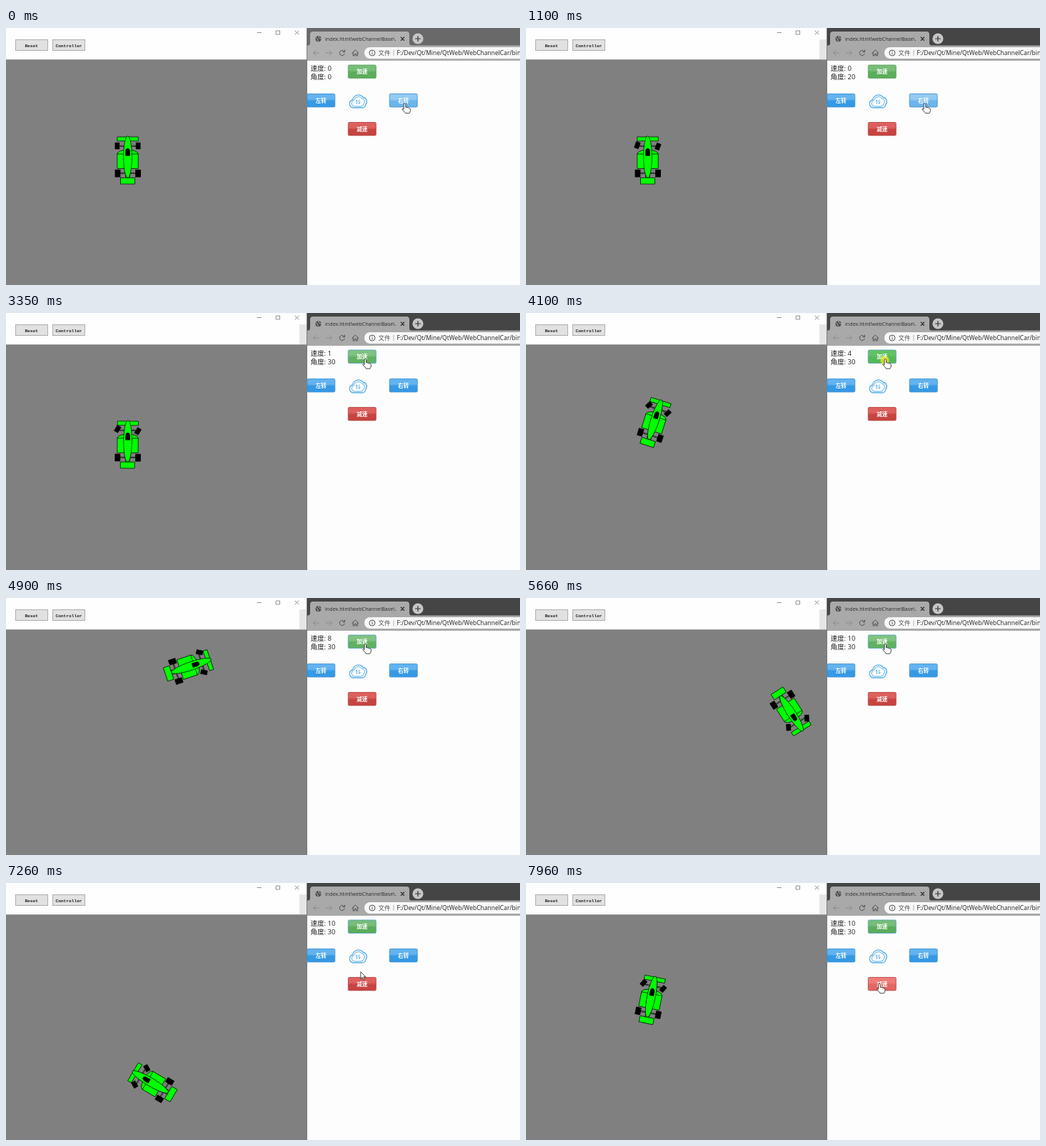
An HTML page that plays this animation: 720 by 361 pixels, repeating every 7.99 s.

```html
<!DOCTYPE html>
<html lang="zh-CN">
<head>
<meta charset="utf-8">
<style>
html, body { margin: 0; width: 100%; height: 100%; overflow: hidden; background: #fdfdfd; }
svg { display: block; width: 720px; height: 361px; }
text { white-space: pre; }
.mono { font: bold 6.2px "Liberation Mono", monospace; fill: #222; text-anchor: middle; }
.ui { font-family: "Open Sans", "Noto Sans CJK SC", "Noto Sans CJK", sans-serif; }
.btn { font: bold 7.6px "Noto Sans CJK SC", "Noto Sans CJK", sans-serif; fill: #fff; text-anchor: middle; }
.line { fill: none; stroke-linecap: round; stroke-linejoin: round; }
</style>
</head>
<body>
<svg id="stage" viewBox="0 0 720 361" xmlns="http://www.w3.org/2000/svg">
  <defs>
    <clipPath id="tabClip"><rect x="446" y="6" width="101" height="18"/></clipPath>
    <clipPath id="sceneClip"><rect y="45" width="421" height="316"/></clipPath>
  </defs>

  <!-- car window -->
  <rect width="421" height="45" fill="#fefefe"/>
  <rect id="blurEdge" x="411" y="16" width="10" height="28" fill="#e5e5e5"/>
  <g class="line" stroke="#777" stroke-width=".8">
    <path d="M352 6.5h5.5M378.5 4h5v5h-5zM405 4l5 5m0-5l-5 5"/>
  </g>
  <g fill="#e1e1e1" stroke="#adadad">
    <rect x="13.5" y="16.5" width="45" height="15"/>
    <rect x="65.5" y="16.5" width="45" height="15"/>
  </g>
  <text class="mono" x="35.7" y="26.6">Reset</text>
  <text class="mono" x="88" y="26.6">Controller</text>
  <rect y="45" width="421" height="316" fill="#808080"/>
  <rect y="44" width="421" height="1" fill="#a0a0a0"/>

  <g clip-path="url(#sceneClip)">
    <g id="car" stroke="#000" stroke-width="1.2">
      <path fill="#a0a0a4" d="M-20-58h40v2h-40zM-20 7h40v2h-40z"/>
      <g fill="#0f0">
        <rect x="-25" y="-79" width="50" height="10"/>
        <ellipse cx="0" cy="-38" rx="25" ry="10"/>
        <rect x="-25" y="-38" width="50" height="35"/>
        <rect x="-5" y="9" width="10" height="10"/>
        <ellipse cx="0" cy="-31" rx="10" ry="50"/>
        <rect x="-17" y="19" width="34" height="15"/>
      </g>
      <path d="M-5-43.5a5 7.5 0 0 1 10 0v9.5h-10z"/>
      <rect id="wheelL" x="-10" y="-7" width="10" height="15"/>
      <rect id="wheelR" x="0" y="-7" width="10" height="15"/>
      <rect x="-30" y="0" width="12" height="17"/>
      <rect x="19" y="0" width="12" height="17"/>
    </g>
  </g>

  <!-- browser window -->
  <rect x="421" y="46" width="299" height="315" fill="#fdfdfd"/>
  <rect id="strip" x="421" width="299" height="25"/>
  <g id="chrome">
    <path d="M422 25q4 0 4-4V9q0-4 4-4h131q4 0 4 4v12q0 4 4 4z"/>
    <rect x="421" y="24.5" width="299" height="21.5"/>
  </g>
  <rect x="421" width="1" height="361" fill="#7c7c82"/>
  <circle cx="437.5" cy="15.3" r="4" fill="#505050"/>
  <path class="line" d="M434.6 13.6q3 2 2.6 4.6M438 11.8q-.8 2.6 3 3.2" stroke="#b8b8b8"/>
  <g clip-path="url(#tabClip)">
    <text class="ui" x="447" y="18" font-size="7.2" fill="#2b2b2b">index.html!webChannelBase\.</text>
  </g>
  <path class="line" d="M553.3 13l4.4 4.4m0-4.4l-4.4 4.4" stroke="#222" stroke-width="1.1"/>
  <circle cx="577" cy="15" r="7.6" fill="#c6c6c6"/>
  <path class="line" d="M573.5 15h7M577 11.5v7" stroke="#333" stroke-width="1.2"/>
  <g class="line" stroke-width=".9">
    <path stroke="#888" d="M438.5 35h-8m3.5-3.5l-3.5 3.5 3.5 3.5M448.5 35h8m-3.5-3.5l3.5 3.5-3.5 3.5"/>
    <path stroke="#4a4a4a" d="M474 33.2a3.6 3.6 0 1 0 .3 3M474.5 31v2.6h-2.6M484.8 35.2l4.5-4.2 4.5 4.2M486.2 34.5v4.5h2v-2.6h2.2v2.6h2v-4.5"/>
  </g>
  <path d="M720 27H510a8 8 0 0 0 0 16H720z" fill="#f8f8f8"/>
  <circle cx="513" cy="35" r="4" fill="none" stroke="#444" stroke-width=".9"/>
  <path d="M513 34.5v2.6M513 32.6v.9" stroke="#444"/>
  <g class="ui" font-size="8.5">
    <text x="521.5" y="38" fill="#555">文件</text>
    <path d="M543 31v8" stroke="#999" stroke-width=".7"/>
    <text x="547.5" y="38" fill="#222">F:/Dev/Qt/Mine/QtWeb/WebChannelCar/bin/</text>
  </g>
  <g class="ui" font-size="9.6" fill="#222">
    <text id="speed" x="426.4" y="60.2"></text>
    <text id="angle" x="426.4" y="72.2"></text>
  </g>
  <g class="line" stroke="#58aee6">
    <path id="cloud" stroke-width="1.3" d="M486.5 112a5.6 5.6 0 0 1-1-11 8.5 8.5 0 0 1 15-3.5 5.8 5.8 0 0 1 3.5 9.5q-.5 5-5.5 5z"/>
    <use href="#cloud" transform="translate(493 104) scale(.76) translate(-493 -104)"/>
    <path d="M491.6 106.5v-5.5l-1.8 1.8M494.6 101v5.5l1.8-1.8"/>
  </g>
  <g id="buttons"></g>

  <circle id="glow" r="6" fill="#f2e820" opacity=".75"/>
  <g id="pointer" stroke="#333" stroke-width=".9" stroke-linejoin="round" fill="#fff">
    <path id="hand" d="M-1.3 1q0-1.5 1.3-1.5t1.3 1.5v4l1.2-.4 1.3.8 1.2-.1 1 .9 1.2.2q1 .6.8 2.5-.1 2.5-1.5 4.3H1q-1-2.300-4.300-4.900-.9-1.300.5-1.600l1.500 1z"/>
    <path id="arrow" d="M0 0v10l2.300-2.200 1.600 3.700 1.700-.8-1.600-3.500h3.200z"/>
  </g>
</svg>
<script>
const LOOP = 7990;
const $ = id => document.getElementById(id);
const set = (el, attrs) => { for (const k in attrs) el.setAttribute(k, attrs[k]); };
const make = (tag, attrs, parent) => {
  const el = document.createElementNS("http://www.w3.org/2000/svg", tag);
  set(el, attrs);
  return parent.appendChild(el);
};

// Top and bottom colours of each button state.
const palettes = {
  blue: { normal: ["#62b3f0", "#3599e4"], hover: ["#93caf2", "#6cb5ea"], pressed: ["#359fec", "#2d97e6"], edge: "#3a8fce" },
  green: { normal: ["#78bd78", "#5bad5b"], hover: ["#80c280", "#62b162"], pressed: ["#62c162", "#56b856"], edge: "#57a057" },
  red: { normal: ["#dc605d", "#c64441"], hover: ["#ee7c79", "#e26663"], pressed: ["#d9534f", "#c9302c"], edge: "#b04441" }
};
for (const [hue, palette] of Object.entries(palettes))
  for (const state of ["normal", "hover", "pressed"]) {
    const gradient = make("linearGradient", { id: hue + state, x2: 0, y2: 1 }, document.querySelector("defs"));
    const [top, bottom] = palette[state];
    [[.4, top], [.55, bottom]].forEach(([offset, color]) =>
      make("stop", { offset, "stop-color": color }, gradient));
  }

const HOLD = 65;
const turnClicks = Array.from({ length: 10 }, (_, i) => 147 + 265 * i);
const gasClicks = [3300, 3500, 3720, 3920, 4130, 4320, 4520, 4720, 4980, 5160, 5330, 5500];

function addButton(x, y, label, hue, clicks = []) {
  const box = make("rect", { x, y, width: 39, height: 18.5, rx: 1.5, "stroke-width": .8 }, $("buttons"));
  make("text", { class: "btn", x: x + 19.5, y: y + 12 }, $("buttons")).textContent = label;
  return { x, y, hue, clicks, box };
}
const buttons = [
  addButton(479.3, 52, "加速", "green", gasClicks),
  addButton(421.8, 92.5, "左转", "blue"),
  addButton(537.2, 92.5, "右转", "blue", turnClicks),
  addButton(479.3, 132.5, "减速", "red")
];

// Heading of the car in degrees; the slope grows with every click on the throttle.
const headings = [[3300, 0], [3500, 2], [3720, 6.3], [3920, 12], [4100, 17.7], [4320, 27.5],
  [4520, 39], [4720, 54], [4900, 71.3], [5160, 96], [5660, 147.3], [6600, 234], [7960, 371.3], [7990, 374.3]];
const mix = (a, b, p) => a + (b - a) * p;
function track(keys, t) {
  if (t <= keys[0][0]) return keys[0][1];
  const i = keys.findIndex(k => k[0] >= t);
  if (i < 0) return keys[keys.length - 1][1];
  const [t0, v0] = keys[i - 1], [t1, v1] = keys[i];
  return mix(v0, v1, (t - t0) / (t1 - t0));
}

const stops = [[558.5, 106.5], [503.4, 65], [495, 141.7]];
const moves = [[2690, 3080], [6760, 7480]];
function pointerAt(t) {
  let [x, y] = stops[0];
  moves.forEach(([from, to], i) => {
    const p = Math.min(1, Math.max(0, (t - from) / (to - from)));
    const e = p * p * (3 - 2 * p);
    x = mix(x, stops[i + 1][0], e);
    y = mix(y, stops[i + 1][1], e);
  });
  return [x, y];
}

const done = (clicks, t) => clicks.filter(c => c <= t).length;
const pressing = (clicks, t) => clicks.some(c => t >= c - HOLD && t < c);

// The turning circle drifts slightly as the steps of the car get longer.
const RADIUS = 104;
function carPose(t, speed) {
  const heading = track(headings, t);
  const phase = (heading + .15 * speed) * Math.PI / 180;
  const x = 274.5 - .13 * speed - RADIUS * Math.cos(phase);
  const y = 199.2 + .15 * speed - RADIUS * Math.sin(phase);
  return `translate(${x} ${y}) rotate(${heading}) scale(.585)`;
}

function render(t) {
  const active = t >= 80;
  set($("strip"), { fill: active ? "#454545" : "#696969" });
  set($("chrome"), { fill: active ? "#a9a9a9" : "#b0b0b0" });
  set($("blurEdge"), { visibility: active ? "visible" : "hidden" });

  const angle = Math.min(30, 5 * done(turnClicks, t));
  const speed = Math.min(10, done(gasClicks, t));
  $("speed").textContent = "速度: " + speed;
  $("angle").textContent = "角度: " + angle;

  set($("car"), { transform: carPose(t, speed) });
  set($("wheelL"), { transform: `translate(-20 -58) rotate(${angle})` });
  set($("wheelR"), { transform: `translate(20 -58) rotate(${angle})` });

  const [px, py] = pointerAt(t);
  let overButton = false, anyPressed = false;
  for (const { x, y, hue, clicks, box } of buttons) {
    const over = px >= x && px <= x + 39 && py >= y && py <= y + 18.5;
    const pressed = pressing(clicks, t);
    const focused = clicks === gasClicks && t >= gasClicks[0] - HOLD;
    overButton ||= over;
    anyPressed ||= pressed;
    set(box, {
      fill: `url(#${hue}${pressed ? "pressed" : over ? "hover" : "normal"})`,
      stroke: focused ? "#4d9fc0" : palettes[hue].edge
    });
  }
  set($("pointer"), { transform: `translate(${px} ${py})` });
  set($("hand"), { visibility: overButton ? "visible" : "hidden" });
  set($("arrow"), { visibility: overButton ? "hidden" : "visible" });
  set($("glow"), { cx: px - .8, cy: py + 1.5, visibility: anyPressed ? "visible" : "hidden" });
}

const start = performance.now();
function tick() {
  render((performance.now() - start) % LOOP);
  requestAnimationFrame(tick);
}
render(0);
requestAnimationFrame(tick);
</script>
</body>
</html>
```
